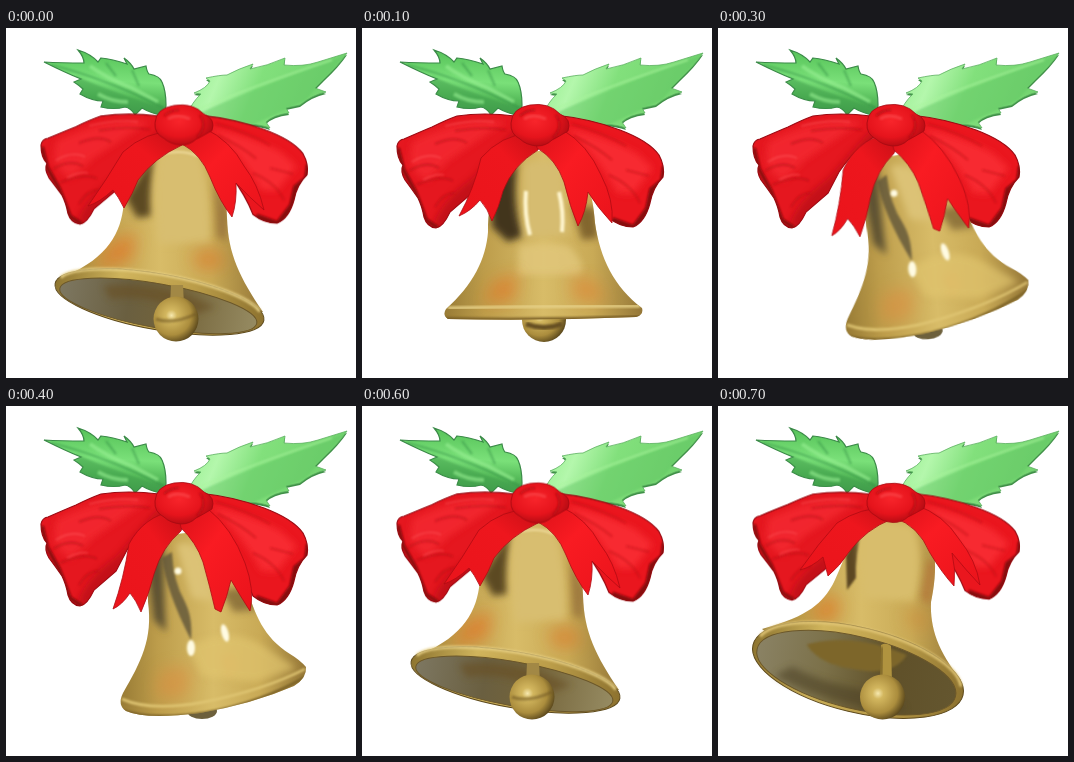
These frames come from a looping animation (350 by 350 pixels, 800 ms). An HTML page:

```html
<!DOCTYPE html>
<html lang="en">
<head>
<meta charset="utf-8">
<title>Swinging bell</title>
<style>
html, body { margin: 0; width: 100%; height: 100%; overflow: hidden; background: #fff; }
svg { display: block; width: 100vw; height: 100vh; }
.pose { visibility: hidden; animation: 800ms step-end infinite; }
.left { animation-name: left; }
.mid { animation-name: mid; }
.right { animation-name: right; }
.far-right { animation-name: far-right; }
.far-left { animation-name: far-left; }
.bow { transform-origin: 175px 90px; animation: bow 800ms step-end infinite; }
@keyframes left { 0%, 75% { visibility: visible } 12.5%, 87.5%, 100% { visibility: hidden } }
@keyframes mid { 0%, 25%, 75%, 100% { visibility: hidden } 12.5%, 62.5% { visibility: visible } }
@keyframes right { 0%, 37.5%, 62.5%, 100% { visibility: hidden } 25%, 50% { visibility: visible } }
@keyframes far-right { 0%, 50%, 100% { visibility: hidden } 37.5% { visibility: visible } }
@keyframes far-left { 0%, 100% { visibility: hidden } 87.5% { visibility: visible } }
@keyframes bow {
  0%, 75% { transform: scaleY(.965) }
  12.5%, 25%, 37.5%, 50%, 62.5% { transform: none }
  87.5%, 100% { transform: scaleY(.945) }
}
.b2 { filter: url(#blur2); }
.b5 { filter: url(#blur5); }
.b9 { filter: url(#blur9); }
.tail { stroke: #b00c14; stroke-width: .8; }
</style>
</head>
<body>
<svg viewBox="0 0 350 350">
<defs>
  <filter id="blur2" x="-50%" y="-50%" width="200%" height="200%"><feGaussianBlur stdDeviation="1.3"/></filter>
  <filter id="blur5" x="-50%" y="-50%" width="200%" height="200%"><feGaussianBlur stdDeviation="3.5"/></filter>
  <filter id="blur9" x="-60%" y="-60%" width="220%" height="220%"><feGaussianBlur stdDeviation="8"/></filter>
  <linearGradient id="gold">
    <stop offset="0" stop-color="#987b35"/><stop offset=".2" stop-color="#bd9d4b"/>
    <stop offset=".5" stop-color="#d8bc68"/><stop offset=".75" stop-color="#c9aa56"/>
    <stop offset="1" stop-color="#957737"/>
  </linearGradient>
  <linearGradient id="lip">
    <stop offset="0" stop-color="#8e7530"/><stop offset=".3" stop-color="#d0b45c"/>
    <stop offset=".65" stop-color="#bb9d49"/><stop offset="1" stop-color="#8d722f"/>
  </linearGradient>
  <linearGradient id="mouth">
    <stop offset="0" stop-color="#7d7761"/><stop offset=".35" stop-color="#6a5f40"/>
    <stop offset=".6" stop-color="#74643a"/><stop offset="1" stop-color="#968b62"/>
  </linearGradient>
  <linearGradient id="deepMouth">
    <stop offset="0" stop-color="#8a8264"/><stop offset=".35" stop-color="#7b7048"/>
    <stop offset=".65" stop-color="#5f5029"/><stop offset="1" stop-color="#64562f"/>
  </linearGradient>
  <radialGradient id="ball" cx=".4" cy=".42" r=".62">
    <stop offset="0" stop-color="#f6e8ae"/><stop offset=".2" stop-color="#d3b75f"/>
    <stop offset=".7" stop-color="#ab8d3d"/><stop offset="1" stop-color="#5d4a1d"/>
  </radialGradient>
  <linearGradient id="tailL" x1="1" y1="0" x2="0" y2="1">
    <stop offset="0" stop-color="#c50e15"/><stop offset=".35" stop-color="#ee161d"/><stop offset="1" stop-color="#ea141b"/>
  </linearGradient>
  <linearGradient id="tailR" x1="0" y1="0" x2="1" y2="1">
    <stop offset="0" stop-color="#da1018"/><stop offset=".4" stop-color="#f91b22"/><stop offset="1" stop-color="#ea131b"/>
  </linearGradient>
  <linearGradient id="leafL" x1=".4" y1="0" x2=".3" y2="1">
    <stop offset="0" stop-color="#55c258"/><stop offset=".45" stop-color="#7ae079"/>
    <stop offset=".7" stop-color="#56bb5a"/><stop offset="1" stop-color="#3f964a"/>
  </linearGradient>
  <linearGradient id="leafR" x1="0" y1=".3" x2="1" y2=".5">
    <stop offset="0" stop-color="#97ee90"/><stop offset=".2" stop-color="#b4f7ac"/>
    <stop offset=".45" stop-color="#82e07c"/><stop offset="1" stop-color="#6fd06c"/>
  </linearGradient>
  <radialGradient id="knot" cx=".42" cy=".4" r=".65">
    <stop offset="0" stop-color="#f8252b"/><stop offset=".6" stop-color="#e6141c"/><stop offset="1" stop-color="#ad0b12"/>
  </radialGradient>

  <path id="leafLShape" d="M38 34Q55 35 78 35Q78 29 72 22Q85 26 92 34L95 30Q106 31 121 36L118 30Q125 35 128 41L140 38Q141 44 143 46Q154 48 156 54Q160 63 160 77L159 88Q144 85 136 80L129 87Q125 80 119 79Q108 82 95 79L97 73Q86 73 74 66L77 61Q74 58 68 54L75 51Q60 45 38 34Z"/>
  <path id="leafRShape" d="M181 87Q186 74 195 66L188 65Q201 60 204 53L200 50Q214 47 221 47Q232 41 247 36L244 41Q261 38 279 30L278 37Q297 39 312 34L341 25Q333 37 318 51L309 60L320 64Q306 67 294 77L280 80L283 85Q267 87 260 94L264 100Q247 94 235 98L208 94Z"/>
  <path id="lobeLShape" d="M35 118Q36 112 42 111Q58 104 70 99Q84 92 95 88Q122 84 153 88L173 100Q143 112 121 144L110 165L88 184Q81 199 74 200Q65 199 62 189Q60 178 56 170Q49 160 43 152Q38 143 41 137Q35 131 35 118Z"/>
  <path id="lobeRShape" d="M193 87Q230 91 258 102Q287 113 297 127Q303 138 301 149Q291 159 288 175Q283 194 271 199Q258 199 247 190Q232 150 190 112Z"/>

  <path id="bellLeft" d="M158 116C136 128 121 153 117 182C113 209 98 234 51 251L150 300L257 284C234 250 222 226 221 190C220 155 213 124 200 116Z"/>
  <path id="bellFarLeft" d="M153 110C134 123 126 157 115 178C105 196 92 210 44 223L130 290L243 274C220 245 212 222 213 196C220 165 219 131 203 110Z"/>
  <path id="bellMid" d="M168 123C136 133 126 165 126 204C124 231 111 257 84 281Q80 287 86 291Q180 293 274 289Q282 287 280 280C252 259 238 230 233 195C231 160 219 126 197 123Z"/>
  <path id="bellRight" d="M170 128C147 139 142 169 142 196C147 233 135 256 117 287Q111 299 120 305Q140 314 194 307Q246 298 288 280Q301 272 300 261Q294 254 284 248C257 231 249 208 240 180C229 149 211 125 190 126Z"/>
  <clipPath id="clipLeft"><use href="#bellLeft"/></clipPath>
  <clipPath id="clipFarLeft"><use href="#bellFarLeft"/></clipPath>
  <clipPath id="clipMid"><use href="#bellMid"/></clipPath>
  <clipPath id="clipRight"><use href="#bellRight"/></clipPath>
  <clipPath id="clipLobeL"><use href="#lobeLShape"/></clipPath>
  <clipPath id="clipLobeR"><use href="#lobeRShape"/></clipPath>
  <clipPath id="clipLeafL"><use href="#leafLShape"/></clipPath>
  <clipPath id="clipLeafR"><use href="#leafRShape"/></clipPath>

  <g id="swungRight">
    <ellipse cx="196" cy="305" rx="15" ry="8" fill="#6d603c"/>
    <use href="#bellRight" fill="url(#gold)"/>
    <g clip-path="url(#clipRight)">
      <path class="b5" d="M140 150L158 140Q157 180 160 226L148 214Z" fill="#5d5132"/>
      <path class="b2" d="M156 152Q160 185 185 234Q187 212 179 196Q167 175 166 146Z" fill="#665a3a" opacity=".85"/>
      <path class="b5" d="M214 184L246 180L250 204L228 206Z" fill="#7b6230" opacity=".75"/>
      <path class="b5" d="M170 138Q190 134 198 150L208 195L186 192Z" fill="#dcc276"/>
      <path class="b9" d="M152 268Q172 254 186 266L180 292H150Z" fill="#e08b3c" opacity=".5"/>
      <path class="b5" d="M214 252L226 246L232 262L222 272Z" fill="#e4a052" opacity=".4"/>
      <path class="b5" d="M182 240Q224 220 254 238L290 262L250 276L196 270Z" fill="#e0c46e" opacity=".7"/>
      <path class="b2" d="M116 293Q145 306 198 296Q258 284 299 263" fill="none" stroke="#e0c673" stroke-width="2.5"/>
      <path class="b2" d="M114 304Q145 315 200 307Q255 297 301 270" fill="none" stroke="#7b6228" stroke-width="3"/>
      <g class="b2" fill="#fffbe2">
        <ellipse cx="185" cy="242" rx="4" ry="8"/><ellipse cx="219" cy="227" rx="3.5" ry="9" transform="rotate(-15 219 227)"/>
        <circle cx="172" cy="165" r="3.5"/>
      </g>
    </g>
    <path class="tail" d="M168 105Q138 110 123 138Q118 172 107 203Q116 199 124 187Q130 194 135 206Q143 188 148 168Q156 141 175 125L180 110Z" fill="url(#tailL)"/>
    <path class="tail" d="M172 107L175 122Q190 136 197 156Q204 181 209 203L215 206Q221 191 225 174Q233 188 244 205Q249 184 239 157Q226 122 202 103Z" fill="url(#tailR)"/>
  </g>
</defs>

<rect width="350" height="350" fill="#fff"/>

<g>
  <use href="#leafLShape" fill="url(#leafL)" stroke="#3b8a48" stroke-width="1.2"/>
  <g clip-path="url(#clipLeafL)">
    <path class="b2" d="M70 48Q105 64 158 80L158 90L90 82L70 66Z" fill="#3d9a4a" opacity=".5"/>
    <path class="b2" d="M84 38Q100 50 126 60L152 74M92 66Q106 74 122 74" fill="none" stroke="#98f093" stroke-width="4" opacity=".6"/>
    <path class="b2" d="M45 37Q96 49 158 80M100 35L110 48M126 42L133 58" fill="none" stroke="#2f8a42" stroke-width="1.6" opacity=".6"/>
  </g>
  <use href="#leafRShape" transform="translate(0 2)" fill="#3f8f47"/>
  <use href="#leafRShape" fill="url(#leafR)" stroke="#5cb060" stroke-width=".8"/>
  <g clip-path="url(#clipLeafR)">
    <path class="b2" d="M183 90Q236 65 340 27L300 72L240 100Z" fill="#5fc462" opacity=".45"/>
    <path class="b2" d="M185 85Q235 62 326 32" fill="none" stroke="#a9f49d" stroke-width="2" opacity=".6"/>
  </g>
</g>

<g class="bow">
  <use href="#lobeLShape" fill="#e5171f" stroke="#9a0a12" stroke-width="1.2"/>
  <g clip-path="url(#clipLobeL)">
    <path class="b5" d="M72 196Q80 172 111 150L152 103L174 100L124 165L78 203Z" fill="#b50e15" opacity=".7"/>
    <path class="b5" d="M50 114Q92 91 144 93Q118 111 87 132L65 153Q48 143 48 130Z" fill="#f42c32" opacity=".8"/>
    <path class="b2" d="M36 120L41 141L53 163L64 192L76 200" fill="none" stroke="#8d0911" stroke-width="4"/>
    <path class="b2" d="M47 143Q64 132 77 140M54 157Q80 146 91 153M93 103Q121 98 144 102M73 116Q93 107 105 115M73 179Q82 164 93 165" fill="none" stroke="#b00d15" stroke-width="2" opacity=".5"/>
    <path class="b2" d="M50 134Q65 124 79 130M61 152Q74 145 82 147M83 98Q110 91 132 94" fill="none" stroke="#ff5a5d" stroke-width="1.8" opacity=".5"/>
  </g>
  <use href="#lobeRShape" fill="#ea161e" stroke="#9a0a12" stroke-width="1.2"/>
  <g clip-path="url(#clipLobeR)">
    <path class="b5" d="M203 99Q244 108 275 125L291 140L271 166L255 165Q237 130 203 99Z" fill="#f92e34" opacity=".85"/>
    <path class="b2" d="M303 138L301 153L290 162L286 181L272 200L250 192" fill="none" stroke="#870910" stroke-width="6"/>
    <path class="b2" d="M210 96Q242 105 264 118M247 147Q270 157 278 175M264 142L287 148M212 108Q235 119 250 132" fill="none" stroke="#b70d15" stroke-width="2" opacity=".45"/>
  </g>
</g>

<g class="pose left">
  <use href="#bellLeft" fill="url(#gold)"/>
  <g clip-path="url(#clipLeft)">
    <path class="b5" d="M120 170L151 120Q142 158 145 188L131 190Z" fill="#5b4821"/>
    <path class="b5" d="M153 126Q175 118 194 126Q205 158 204 215L153 216Q146 166 153 126Z" fill="#d8be70"/>
    <path class="b5" d="M208 150L223 185L220 214L211 208Z" fill="#96713a" opacity=".8"/>
    <path class="b9" d="M104 215L130 204L126 232L88 242Z" fill="#e17625" opacity=".7"/>
    <path class="b9" d="M184 227L210 220L220 238L195 242Z" fill="#df7628" opacity=".6"/>
    <path class="b2" d="M155 126Q177 121 191 128" fill="none" stroke="#efdb9c" stroke-width="2"/>
  </g>
  <g transform="rotate(10 153.5 274)">
    <ellipse cx="153.5" cy="274" rx="106" ry="28" fill="url(#lip)" stroke="#5e4a1c" stroke-width="1"/>
    <path class="b2" d="M52 267A103 25 0 0 1 254 266" fill="none" stroke="#e6cf83" stroke-width="3"/>
    <ellipse cx="153" cy="278" rx="100" ry="22" fill="url(#mouth)" stroke="#6b572a"/>
    <path class="b5" d="M95 268Q145 253 210 269L190 280Q135 267 105 280Z" fill="#695126" opacity=".7"/>
  </g>
  <path d="M165 257H177L178 277H164Z" fill="#a28845"/>
  <circle cx="170" cy="291" r="22.5" fill="url(#ball)"/>
  <path class="b2" d="M150 291Q166 297 190 286" fill="none" stroke="#6d5422" stroke-width="3" opacity=".6"/>
  <path class="tail" d="M170 103Q140 103 117 124Q101 151 82 178Q94 174 107 162Q112 168 118 180Q127 165 132 152Q148 130 176 117L180 106Z" fill="url(#tailL)"/>
  <path class="tail" d="M172 105L176 116Q195 126 204 149Q214 174 226 189Q231 174 230 155Q243 169 258 182Q252 156 238 138Q225 113 198 100Z" fill="url(#tailR)"/>
</g>

<g class="pose mid">
  <circle cx="182" cy="292" r="22" fill="url(#ball)"/>
  <path class="b2" d="M164 296Q182 303 200 296" fill="none" stroke="#665021" stroke-width="5"/>
  <use href="#bellMid" fill="url(#gold)"/>
  <g clip-path="url(#clipMid)">
    <path class="b5" d="M128 160L156 134Q149 174 161 208L146 214L130 199Z" fill="#42361a"/>
    <path class="b5" d="M162 137Q180 128 200 137L207 207L162 210Z" fill="#d6bc70"/>
    <path class="b5" d="M210 177L234 180L236 210L220 212Z" fill="#7a5e2a" opacity=".9"/>
    <path class="b5" d="M157 218Q182 212 207 218Q226 238 217 247H156Z" fill="#e1c77b" opacity=".8"/>
    <path class="b9" d="M133 252L156 245L152 273L120 275Z" fill="#e17828" opacity=".65"/>
    <path class="b9" d="M209 250L230 250L246 273L212 272Z" fill="#e08333" opacity=".6"/>
    <path class="b2" d="M86 280Q180 278 278 278" fill="none" stroke="#e5cf85" stroke-width="3"/>
    <path class="b2" d="M82 291Q180 293 280 289" fill="none" stroke="#7b6128" stroke-width="4"/>
    <path class="b2" d="M164 163Q162 186 168 207M197 164Q202 184 200 204" fill="none" stroke="#fff6cf" stroke-width="4"/>
  </g>
  <path class="tail" d="M168 105Q139 107 119 130Q112 161 97 188Q109 183 118 172Q126 181 130 193Q137 179 141 163Q151 137 176 122L180 108Z" fill="url(#tailL)"/>
  <path class="tail" d="M172 106L175 120Q194 131 202 154Q208 179 216 198Q224 184 226 164Q235 179 250 195Q252 172 239 147Q226 117 201 102Z" fill="url(#tailR)"/>
</g>

<g class="pose right"><use href="#swungRight"/></g>
<g class="pose far-right"><use href="#swungRight" transform="rotate(-4 178 108)"/></g>

<g class="pose far-left">
  <use href="#bellFarLeft" fill="url(#gold)"/>
  <g clip-path="url(#clipFarLeft)">
    <path class="b2" d="M128 150L145 120Q137 150 138 172L129 184Z" fill="#5b4620"/>
    <path class="b5" d="M143 120Q170 112 195 120Q208 149 196 196L145 192Q139 145 143 120Z" fill="#d8bd6c"/>
    <path class="b5" d="M210 152L219 158L212 200L203 192Z" fill="#b5783a" opacity=".8"/>
    <path class="b9" d="M90 208L112 188L124 200L112 218Z" fill="#e17a25" opacity=".7"/>
    <path class="b9" d="M185 208L208 200L212 228L192 220Z" fill="#d08a38" opacity=".5"/>
  </g>
  <g transform="rotate(13.5 140 264)">
    <ellipse cx="140" cy="264" rx="108" ry="42.5" fill="url(#lip)" stroke="#5e4a1c" stroke-width="1"/>
    <path class="b2" d="M37 254A105 39 0 0 1 244 256" fill="none" stroke="#e0c575" stroke-width="3"/>
    <ellipse cx="139" cy="267" rx="102" ry="36" fill="url(#deepMouth)" stroke="#6b572a"/>
    <path class="b2" d="M84 251Q128 228 184 238Q176 262 138 264Q100 268 84 251Z" fill="#7d662c"/>
    <path class="b5" d="M60 289Q130 307 196 292L180 279Q120 288 75 276Z" fill="#4d4328" opacity=".6"/>
  </g>
  <path d="M163 239Q168 236 173 240L174 276H162Z" fill="#b0933f"/>
  <path class="b2" d="M164 241L163 273" stroke="#6b5422" stroke-width="2"/>
  <circle cx="164.5" cy="291" r="22.5" fill="url(#ball)"/>
  <path class="tail" d="M170 102Q143 101 119 117Q100 138 82 164Q94 161 105 151L110 170Q122 160 131 146Q148 123 174 113L180 104Z" fill="url(#tailL)"/>
  <path class="tail" d="M172 103L176 112Q200 119 212 147Q224 167 236 180Q238 163 234 147Q247 163 262 179Q258 154 241 133Q226 109 198 99Z" fill="url(#tailR)"/>
</g>

<g class="bow">
  <path d="M149 95Q150 80 168 77Q187 74 198 86Q210 91 206 103Q196 109 190 112Q184 118 175 118Q164 117 158 111Q148 106 149 95Z" fill="url(#knot)" stroke="#a50b12" stroke-width=".8"/>
  <path class="b2" d="M194 87Q202 98 191 110M158 88Q164 82 173 82" fill="none" stroke="#a90c13" stroke-width="1.8" opacity=".8"/>
  <path class="b2" d="M162 91Q171 85 184 91" fill="none" stroke="#ff5a5c" stroke-width="3" opacity=".5"/>
</g>
</svg>
</body>
</html>
```
